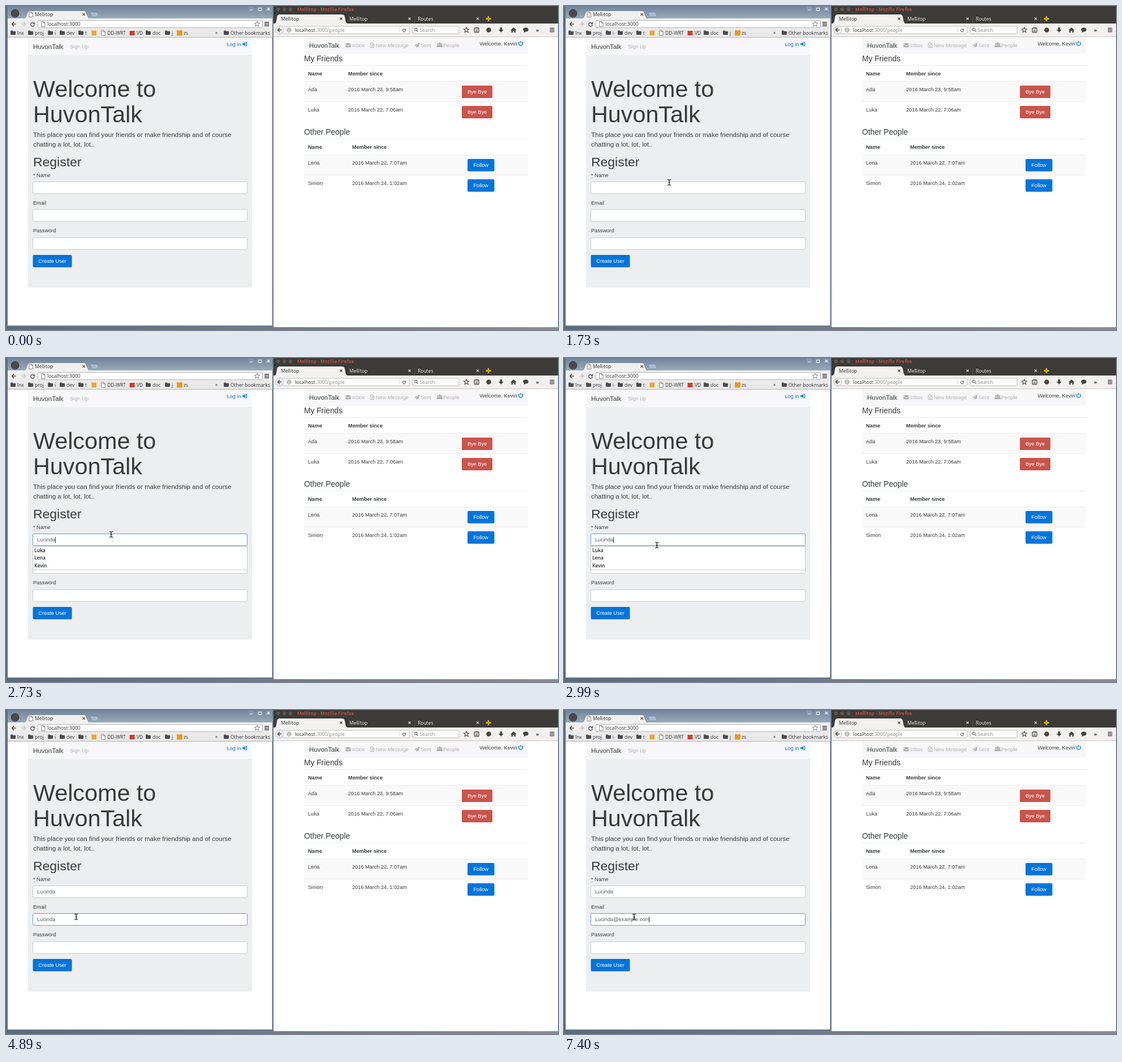
An HTML page that plays this animation: 976 by 574 pixels, repeating every 8000 ms.

```html
<!DOCTYPE html>
<html lang="en">
<head>
<meta charset="utf-8">
<title>Sign-up form</title>
<style>
  html, body { margin: 0; width: 100%; height: 100%; overflow: hidden; background: #fff; }
  svg { display: block; width: 976px; height: 574px; }
  text { font: 9.18px "Liberation Sans", Arial, sans-serif; fill: #373a3c; white-space: pre; }
  .ui { font: 8.5px "Open Sans", "Noto Sans", sans-serif; fill: #333; }
  .url { font-size: 8.7px; }
  .title { font-size: 8.2px; font-weight: 700; fill: #a9544c; }
  .option { font-weight: 600; fill: #222; }
  .hero { font-size: 41.3px; }
  .h1 { font-size: 22.96px; }
  .h4 { font-size: 13.78px; }
  .lead { font-size: 11.48px; }
  .bold { font-weight: 700; }
  .mid { text-anchor: middle; fill: #fff; }
  .end { text-anchor: end; }
  .muted { fill: #b1b1b2; }
  .grey { fill: #8a8a8a; }
  .light { fill: #f0eee9; }
  .link { fill: #0275d8; }
  .value { fill: #55595c; }
  .line { fill: none; stroke: #4a4a4a; stroke-width: 1.4; }
</style>
</head>
<body>
<svg id="stage" viewBox="0 0 976 574" xmlns="http://www.w3.org/2000/svg"></svg>
<script>
const LOOP = 8000;
const BLUE = '#0275d8', RED = '#c9544c', FOCUS = '#5c9fd6', BORDER = '#ccc';
const APP = 'Mellitop', SITE = 'HuvonTalk', USER = 'Lucinda', MAIL = USER + '@example.com';

const rect = (x, y, w, h, fill, more = '') =>
  `<rect x="${x}" y="${y}" width="${w}" height="${h}" fill="${fill}" ${more}/>`;
const text = (x, y, s, cls = '', more = '') => `<text x="${x}" y="${y}" class="${cls}" ${more}>${s}</text>`;
const path = (d, more = 'class="line"') => `<path d="${d}" ${more}/>`;
const circle = (x, y, r, more) => `<circle cx="${x}" cy="${y}" r="${r}" ${more}/>`;
const fill = c => `fill="${c}"`;
const stroke = (c, w = 1) => `fill="none" stroke="${c}" stroke-width="${w}"`;
const gradient = (id, a, b, dir = 'x2="0" y2="1"') =>
  `<linearGradient id="${id}" ${dir}><stop stop-color="${a}"/><stop offset="1" stop-color="${b}"/></linearGradient>`;

// Icons
const folder = x => path(`M${x} 44.5q0-1 1-1h2.5l1 1.3H${x + 8}q1 0 1 1v4.2q0 1-1 1H${x + 1}q-1 0-1-1z`, fill('#4a4a4a'));
const doc = (x, y) => path(`M${x} ${y}h4l2.5 2.5v6.5h-6.5zM${x + 4} ${y}v2.5h2.5`, 'fill="#fff" stroke="#777" stroke-width=".9"');
const cross = (x, y, c, r = 2) => path(`M${x - r} ${y - r}l${2 * r} ${2 * r}m0 ${-2 * r}l${-2 * r} ${2 * r}`, stroke(c, 1.2));
const menu = (x, y) => path(`M${x} ${y}h8m-8 3h8m-8 3h8`, stroke('#3d3d3d', 1.5));
const arrow = (x, y, c) => path(`M${x + 8} ${y}H${x + 1}m3.6-3.7L${x + 1} ${y}l3.6 3.7`, stroke(c, 1.6));
const reload = (x, y, c, r = 3.3) =>
  path(`M${x + r} ${y + .8}a${r} ${r} 0 1 1-${r * .55}-${r * .95}`, stroke(c, 1.3)) +
  path(`M${x + r + .6} ${y - r - .6}v3.8h-3.8z`, fill(c));
function star(x, y, r, more) {
  const pts = Array.from({ length: 10 }, (_, i) => {
    const a = i * Math.PI / 5 - Math.PI / 2, q = i % 2 ? r * .45 : r;
    return `${(x + q * Math.cos(a)).toFixed(2)},${(y + q * Math.sin(a)).toFixed(2)}`;
  });
  return `<polygon points="${pts.join(' ')}" ${more}/>`;
}

function chrome() {
  const marks = [[8, 'lnx'], [39, 'proj'], [74, 'i'], [95, 'dev'], [128, 't'], [247, 'doc'], [281, 'j'], [385, 'Other bookmarks']];
  return rect(2, 0, 470.5, 568, '#6c8097', 'id="frame"') +
    rect(3, 0, 468.5, 22, 'url(#bar)', 'id="bar"') +
    circle(16, 13, 7.5, fill('#45484d')) +
    path('M31 22.5q3 0 4.5-4l2.5-6.5q1.5-3.5 4-3.5h96q3 0 4 3.5l2.5 6.5q1.5 4 4.5 4z', 'fill="#f1f1f1" stroke="#66788c" stroke-width=".7"') +
    path('M149 11h10.5q2 0 2.5 1.5l2.5 6.5h-11q-2 0-2.5-1.5z', 'fill="#a9bbcf" stroke="#7288a0" stroke-width=".7"') +
    doc(41, 10.5) + text(51, 18, APP, 'ui') + cross(137.5, 15, '#555') +
    [434, 449, 464].map(x => rect(x - 5, 1, 10, 9, '#9aabbd', 'rx="1.5" opacity=".4"')).join('') +
    path('M431.5 7h5M446.5 3.5h5v4.5h-5z', stroke('#eef2f6')) + cross(464, 5.5, '#eef2f6') +
    rect(3, 22, 468, 33, 'url(#tools)') + rect(3, 55, 468, 1, '#b6b6b6') +
    arrow(9.5, 32, '#4a4a4a') + `<g transform="matrix(-1 0 0 1 62 0)">${arrow(26.5, 32, '#c3c3c3')}</g>` +
    reload(47, 32, '#4a4a4a') +
    rect(56.5, 25.5, 397, 13, '#fff', 'rx="1.5" stroke="#b4b4b4"') + doc(62.5, 27.5) +
    text(73, 35, 'localhost:3000', 'ui url') +
    star(444, 32, 5, stroke('#777', .9)) + menu(457, 29) +
    marks.map(([x, s]) => folder(x) + text(x + 12, 50.5, s, 'ui')).join('') +
    rect(151.5, 43.5, 8.5, 8.5, '#e9a33b') +
    doc(168.5, 43) + text(179, 50.5, 'DD-WRT', 'ui') +
    rect(218.5, 44, 9, 8, '#d23a32') + text(231, 50.5, 'VD', 'ui') +
    rect(302, 43, 10, 9.5, '#e89b25') + text(314, 50.5, 'zs', 'ui') +
    text(370, 50, '»', 'ui');
}

const field = (id, y) => rect(47.5, y, 379, 21, '#fff', `id="${id}" rx="2" stroke="${BORDER}"`);
const button = (x, y, w, s, c) => rect(x, y, w, 22, c, 'rx="2"') + text(x + w / 2, y + 14.2, s, 'mid');

function signUp() {
  return rect(3, 56, 467.5, 510, '#fff') +
    rect(39, 56, 396, 31, '#f7f7f9') + rect(39, 87, 396, 412, '#eceeef') +
    text(48, 75.5, SITE, 'lead') + text(113, 74.8, 'Sign Up', 'muted') + text(390.5, 70.5, 'Log in', 'link') +
    path('M418 66.3h3v-2l3.3 3.2-3.3 3.2v-2h-3z', fill(BLUE)) +
    path('M423 64.3h2.5v6.4H423', stroke(BLUE, 1.1)) +
    text(48, 160.8, 'Welcome to', 'hero') + text(48, 206.2, SITE, 'hero') +
    text(48, 231.7, 'This place you can find your friends or make friendship and of course', 'lead') +
    text(48, 248.9, 'chatting a lot, lot, lot..', 'lead') +
    text(48, 283.5, 'Register', 'h1') +
    text(48, 302.5, '* Name') + path('M48 304.5h4', 'stroke="#777" stroke-width=".7" stroke-dasharray="1 1"') +
    text(48, 352, 'Email') + text(48, 401.2, 'Password') +
    field('name', 311.5) + field('email', 360.5) + field('pass', 410.5) +
    text(55, 324.9, '', 'value', 'id="nameText"') + text(55, 374.3, '', 'value', 'id="emailText"') +
    button(47.5, 441, 69, 'Create User', BLUE) +
    `<g id="list">${rect(47.5, 333.5, 379, 42, '#fff', 'stroke="#c8c8c8"')}` +
    ['Luka', 'Lena', 'Kevin'].map((s, i) => text(50, 343.5 + i * 13.8, s, 'ui option')).join('') + '</g>' +
    rect(55, 317, 1, 10.5, '#444', 'id="caret"');
}

function firefox() {
  const dark = fill('#444');
  return rect(473, 0, 503, 32, '#3c3b37') +
    [481, 492, 503].map(x => circle(x, 6, 4, 'fill="#5b5953" stroke="#2e2d2a" stroke-width=".7"')).join('') +
    text(515, 9, APP + ' - Mozilla Firefox', 'ui title') +
    path('M473 31.5q4 0 5-5l1-7q1-4.5 4-4.5h112q3 0 4 4.5l1.5 7q1 5 5 5z', fill('#f2f1f0')) +
    path('M722.5 17v13M843.5 17v13', stroke('#56544e')) +
    text(486, 25.5, APP, 'ui') + text(607, 25.5, APP, 'ui light') + text(728, 25.5, 'Routes', 'ui light') +
    cross(592.5, 22.5, '#444') + cross(713.5, 22.5, '#dcd9d2') + cross(834, 22.5, '#dcd9d2') +
    path('M853 18v9m-4.5-4.5h9', stroke('#c9ac2c', 2.8)) +
    rect(473, 31, 503, 24, '#f2f1f0') + rect(473, 54, 503, 1, '#c9c5c0') +
    rect(488.5, 36, 224.5, 13, '#fff', 'rx="1.5" stroke="#c3bfb9"') +
    circle(484, 42.5, 7, 'fill="#fafafa" stroke="#b0aca6"') + arrow(479.5, 42.5, '#444') +
    circle(500.5, 42.5, 3.8, stroke('#8c8c8c', .9)) + path('M497 42.5h7m-3.5-3.7q-3.5 3.7 0 7.4q3.5-3.7 0-7.4', stroke('#8c8c8c', .8)) +
    text(511, 45.7, 'localhost<tspan class="grey">:3000/people</tspan>', 'ui') +
    path('M695.5 38v9', stroke('#ddd')) + reload(704, 42.5, '#888', 2.6) +
    rect(718.5, 36, 82.5, 13, '#fff', 'rx="1.5" stroke="#c3bfb9"') +
    circle(724.5, 41.5, 2.4, stroke('#777', 1.1)) + path('M726.3 43.3l2.5 2.7', stroke('#777', 1.3)) +
    text(731.5, 45.7, 'Search', 'ui grey') +
    star(814, 42.5, 4.8, stroke('#444', 1.1)) +
    rect(828, 39, 8, 7.5, 'none', 'rx="1" stroke="#444" stroke-width="1.3"') + path('M830 38.5h4M830 42h4m-4 2.3h4', stroke('#444', 1)) +
    circle(853.5, 42.5, 4.3, dark) +
    path('M873.5 38h3.5v4h2.8l-4.5 4.8-4.5-4.8h2.7z', dark) +
    path('M892 43l5.3-5 5.3 5h-1.5v4h-2.6v-3h-2.4v3h-2.6v-4z', dark) +
    path('M919 38.3c6.4 0 6.4 7.3 0 7.3l-3.5 1.6.7-2.3c-4-2.5-1.7-6.6 2.8-6.6z', dark) +
    text(937, 46, '»', 'ui url bold') + menu(961.5, 39.5);
}

function table(y, dx, names, dates, label, bx, bw, color) {
  const rows = names.map((n, i) => {
    const top = y + 28.5 + i * 36;
    return rect(527, top, 396, 36.5, i ? '#fff' : '#f9f9f9') + rect(527, top - .3, 396, .9, '#e9ebec') +
      text(534, top + 17.8, n) + text(dx, top + 17.8, dates[i]) + button(bx, top + 7.5, bw, label, color);
  });
  return rect(527, y, 396, .9, '#eceeef') + text(534, y + 17.7, 'Name', 'bold') +
    text(dx, y + 17.7, 'Member since', 'bold') + rows.join('');
}

function people() {
  const tint = fill('#adadae');
  return rect(473, 55, 503, 514, '#fff') + rect(527, 55, 396, 30, '#f7f7f9') +
    text(536, 73.8, SITE, 'lead') +
    path('M600.5 66h9v1.2l-4.5 3-4.5-3zM600.5 68.3l4.5 3 4.5-3v5h-9z', tint) + text(612, 73, 'Inbox', 'muted') +
    path('M644 65.5h4.5l2.5 2.5v5.5h-7zM648.5 65.5v2.5h2.5M645.8 69.5h3.5m-3.5 2h3.5', stroke('#adadae', .9)) +
    text(654, 73, 'New Message', 'muted') +
    path('M731 65l-1.5 8-2.6-1.1-1.7 2.1v-3l4-4.3-5 3.9-2.4-1z', tint) + text(733, 73, 'Sent', 'muted') +
    [[763.5, 68, 1.5], [770, 68, 1.5], [766.8, 67.8, 2.1]].map(([x, y, r]) =>
      circle(x, y - r * .4, r, tint) + path(`M${x - r * 1.5} ${y + 5}q0-3.7 ${r * 1.5}-3.7t${r * 1.5} 3.7z`, tint)).join('') +
    text(773, 73, 'People', 'muted') +
    text(903.5, 69.5, 'Welcome, Kevin', 'end') +
    path('M907.9 63.7a3.5 3.5 0 1 0 4.2 0M910 62v4', stroke(BLUE, 1.3)) +
    text(527, 98, 'My Friends', 'h4') + text(527, 228, 'Other People', 'h4') +
    table(105, 605, ['Ada', 'Luka'], ['2016 March 23, 9:58am', '2016 March 22, 7:06am'], 'Bye Bye', 806, 54, RED) +
    table(235, 612, ['Lena', 'Simon'], ['2016 March 22, 7:07am', '2016 March 24, 1:02am'], 'Follow', 816, 47.5, BLUE);
}

const pointer = '<g id="arrow">' +
  path('M.5.5v11l2.6-2.4 1.8 4.2 1.8-.8-1.8-4.1h3.6z', 'fill="#fff" stroke="#222" stroke-width=".9"') + '</g>' +
  '<g id="beam">' + path('M-3-5q2.5 0 3 1.2q.5-1.2 3-1.2M0-4v8M-3 5q2.5 0 3-1.2q.5 1.2 3 1.2M-1.5 0h3', stroke('#333', 1.3)) + '</g>';

document.getElementById('stage').innerHTML =
  '<defs>' + gradient('bar', '#71849a', '#9aa9b9') + gradient('barOn', '#5a7391', '#93a5b8') +
  gradient('tools', '#f1f1f1', '#e7e7e7') + gradient('desk', '#5f6a74', '#868d92', 'x2="1" y2="0"') + '</defs>' +
  rect(0, 0, 976, 574, 'url(#desk)') + chrome() + signUp() + firefox() + people() + pointer;

// Timeline
const CLICK = 1920, NAMED = 2730, NEXT = 3330;
const keys = [4290, 5250, 6070, 6240, 6390, 6540, 6680, 6800, 6920, 7040, 7180, 7320, 7400];
const carets = [[CLICK, 2420], [NAMED, 3960], [4290, 4890], [5250, 5850], [6070, LOOP]];
const part = {};
for (const id of ['frame', 'bar', 'name', 'email', 'nameText', 'emailText', 'list', 'caret', 'arrow', 'beam'])
  part[id] = document.getElementById(id);
const show = (el, on) => el.setAttribute('visibility', on ? 'visible' : 'hidden');
const ease = p => p * p * (3 - 2 * p);
const stepped = (t, from, gap, n) => ease(Math.min(n, Math.max(0, Math.floor((t - from) / gap) + 1)) / n);
const bezier = (u, a, b, c, d) => { const v = 1 - u; return a * v * v * v + 3 * b * v * v * u + 3 * c * v * u * u + d * u * u * u; };

function mouse(t) {
  if (t < 1060) return [837, 95];
  if (t < 2790) {
    const u = stepped(t, 1240, 40.8, 13);
    return [bezier(u, 837, 650, 330, 186), bezier(u, 116, 230, 492, 312.5)];
  }
  const u = stepped(t, 2790, 54, 10);
  return [186 - 62 * u, 312.5 + 54 * u];
}

function draw(t) {
  const active = t >= CLICK, inMail = t >= NEXT, open = t >= NAMED && !inMail;
  part.frame.setAttribute('fill', active ? '#5f7690' : '#6c8097');
  part.bar.setAttribute('fill', active ? 'url(#barOn)' : 'url(#bar)');
  part.name.setAttribute('stroke', active && !inMail ? FOCUS : BORDER);
  part.email.setAttribute('stroke', inMail ? FOCUS : BORDER);
  show(part.list, open);

  const typed = keys.filter(k => k <= t).length;
  part.nameText.textContent = t >= NAMED ? USER : '';
  part.emailText.textContent = typed ? MAIL.slice(0, USER.length + typed - 1) : '';
  const box = inMail ? part.emailText : part.nameText;
  part.caret.setAttribute('x', 55 + Math.floor(box.textContent ? box.getComputedTextLength() : 0));
  part.caret.setAttribute('y', inMail ? 366 : 317);
  show(part.caret, carets.some(([a, b]) => t >= a && t < b));

  const [x, y] = mouse(t);
  const over = x > 48 && x < 426 && (y > 311 && y < 333 || y > 360 && y < 382 && !open);
  show(part.arrow, t >= 1020 && !over);
  show(part.beam, t >= 1020 && over);
  for (const el of [part.arrow, part.beam]) el.setAttribute('transform', `translate(${x.toFixed(1)} ${y.toFixed(1)})`);
}

const start = performance.now();
function tick() {
  draw((performance.now() - start) % LOOP);
  requestAnimationFrame(tick);
}
tick();
</script>
</body>
</html>
```
